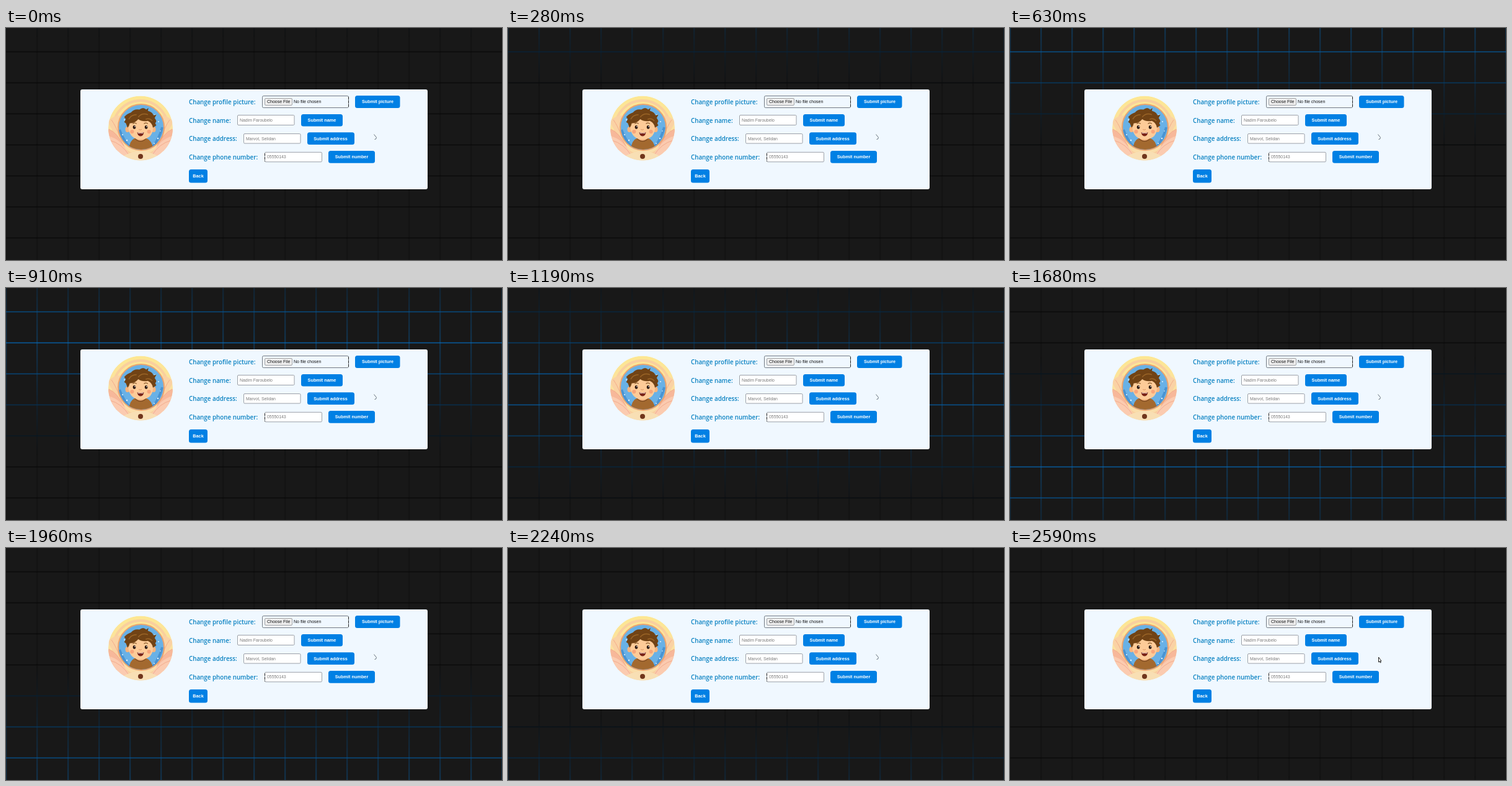
Recreate the animation shown at these times as an HTML page. Size 800 px wide and 374 px high, loop 2.66 s.

```html
<!DOCTYPE html>
<html lang="en">
<head>
<meta charset="utf-8">
<title>Edit profile</title>
<style>
  html, body { margin: 0; width: 100%; height: 100%; overflow: hidden; background: #050505; }
  svg { display: block; width: 800px; height: 374px; }
  .glow { animation: sweep 2660ms steps(38, end) infinite; }
  .rest { animation: rest 2660ms step-end infinite; }
  .moved { animation: moved 2660ms step-end infinite; }
  @keyframes sweep { from { transform: translateY(-360px); } to { transform: translateY(388px); } }
  @keyframes rest { 0% { opacity: 1; } 97.36%, 100% { opacity: 0; } }
  @keyframes moved { 0% { opacity: 0; } 97.36%, 100% { opacity: 1; } }
  .label { font: 600 9.8px "Open Sans", "Noto Sans", sans-serif; fill: #0a82c2; }
  .btn rect { fill: #0080e4; }
  .btn text { font: bold 7.3px "Liberation Sans", Arial, sans-serif; fill: #fff; text-anchor: middle; }
  .field rect { fill: #fff; stroke: #858a92; stroke-width: .8; }
  .field text { font: 6.9px "Liberation Sans", Arial, sans-serif; fill: #7b7b7b; }
  .file text { font: 7px "Liberation Sans", Arial, sans-serif; fill: #111; }
  .dash { stroke: #222; stroke-dasharray: 4 2; }
</style>
</head>
<body>
<svg viewBox="0 0 800 374">
  <defs>
    <linearGradient id="beam" x1="0" y1="0" x2="0" y2="1">
      <stop offset="0" stop-color="#030303"/>
      <stop offset=".5" stop-color="#0080e4"/>
      <stop offset="1" stop-color="#030303"/>
    </linearGradient>
    <pattern id="tiles" x="-.6" y="37.7" width="50" height="50" patternUnits="userSpaceOnUse">
      <rect width="50" height="1.2" fill="#181818" opacity=".14"/>
      <rect y="1.2" width="1.2" height="48.8" fill="#181818" opacity=".6"/>
      <rect x="1.2" y="1.2" width="48.8" height="48.8" fill="#181818"/>
    </pattern>
    <linearGradient id="cream" x1="0" y1="0" x2="0" y2="1">
      <stop offset="0" stop-color="#fde792"/>
      <stop offset="1" stop-color="#f9dcae"/>
    </linearGradient>
    <clipPath id="badge"><circle cx="217" cy="161.5" r="52"/></clipPath>
    <clipPath id="inner"><circle cx="218" cy="160" r="36"/></clipPath>
    <g id="petals">
      <path d="M164 150Q178 138 187 142Q177 156 183 176Q170 166 164 150Z" fill="#fad2a4"/>
      <path d="M162 162Q181 168 192 193Q178 203 166 190Z" fill="#f7b89a"/>
      <path d="M164 174Q185 178 199 204Q181 211 170 196Z" fill="#fbcbb0"/>
      <path d="M167 181Q187 186 199 206M166 163Q180 170 190 190M170 148Q177 158 184 176"
        fill="none" stroke="#f1a88a" stroke-width=".9"/>
    </g>
  </defs>

  <rect class="glow" width="800" height="374" fill="url(#beam)"/>
  <rect width="800" height="374" fill="url(#tiles)"/>
  <rect x="120" y="99" width="560" height="161" rx="3" fill="#f0f8ff"/>

  <!-- avatar -->
  <g clip-path="url(#badge)">
    <circle cx="217" cy="161.5" r="52" fill="url(#cream)"/>
    <circle cx="217" cy="161" r="44" fill="none" stroke="#f9cf9e" stroke-width="4"/>
    <use href="#petals"/>
    <use href="#petals" transform="matrix(-1 0 0 1 434 0)"/>
    <path d="M188 207Q217 190 246 207L238 216H196Z" fill="#f8dfb4"/>
    <circle cx="217" cy="207" r="4" fill="#70351b"/>
  </g>
  <circle cx="218" cy="160" r="37" fill="#69b1e6" stroke="#eba36f" stroke-width="2"/>
  <g clip-path="url(#inner)">
    <path d="M183 164Q190 184 202 194M252 160Q247 180 236 192" fill="none" stroke="#4a94d2" stroke-width="4"/>
    <g fill="#e4f4ff">
      <circle cx="191" cy="148" r="1"/><circle cx="246" cy="151" r="1"/>
      <circle cx="188" cy="172" r="1"/><circle cx="195" cy="181" r="1.2"/>
      <circle cx="245" cy="178" r="1.2"/><circle cx="249" cy="166" r=".8"/>
      <circle cx="239" cy="186" r=".9"/><circle cx="240" cy="140" r=".9"/>
    </g>
    <path d="M198 200Q198 182 207 178H227Q237 182 238 200Z" fill="#a3692f"/>
    <path d="M208 178Q217 187 226 178" fill="#efad76" stroke="#7e4b1f" stroke-width="1.2"/>
  </g>
  <g transform="translate(217 158) scale(.91) translate(-217 -158)">
    <g fill="#f6b57f">
      <ellipse cx="194" cy="164" rx="4" ry="5"/><ellipse cx="240" cy="164" rx="4" ry="5"/>
    </g>
    <path d="M195 152Q198 143 216 143Q236 143 239 156Q241 181 217 182Q194 181 195 152Z" fill="#fdcb98"/>
    <path d="M194 161L191 153L188 151L191 146L188 142Q193 136 200 134Q206 127 215 129Q222 123 227 129L231 126L230 131Q238 133 240 139L245 138L242 144Q247 149 243 153L245 157L239 161Q238 153 230 149Q220 151 213 146Q206 154 198 153Q197 158 194 161Z" fill="#714315"/>
    <path d="M196 146Q200 138 210 138M213 142Q220 134 230 138M226 146Q233 143 238 149"
      fill="none" stroke="#9b6527" stroke-width="1.6"/>
    <path d="M203 154Q207 151 210 154M223 154Q227 151 230 154" fill="none" stroke="#714315" stroke-width="1.2"/>
    <g fill="#2b1710"><ellipse cx="206" cy="160" rx="2.6" ry="3.2"/><ellipse cx="227" cy="160" rx="2.6" ry="3.2"/></g>
    <g fill="#fff"><circle cx="207" cy="159" r=".9"/><circle cx="228" cy="159" r=".9"/></g>
    <g fill="#f69c75" opacity=".8"><circle cx="202" cy="168" r="3.4"/><circle cx="232" cy="168" r="3.4"/></g>
    <path d="M214 164Q216.500 166 219 164" fill="none" stroke="#d98a59"/>
    <path d="M211 169Q217 171 223 169Q222 176 217 176Q212 176 211 169Z" fill="#792318"/>
    <path d="M212 169.500Q217 171 222 169.500L221.500 171H212.500Z" fill="#fff"/>
  </g>

  <!-- form -->
  <g class="label">
    <text x="295" y="123">Change profile picture:</text>
    <text x="295" y="152.500">Change name:</text>
    <text x="295" y="182.200">Change address:</text>
    <text x="295" y="212">Change phone number:</text>
  </g>
  <g class="file">
    <rect x="413.500" y="109.500" width="139" height="19" rx="2" fill="none" stroke="#555b64" stroke-width=".8"/>
    <path class="dash" d="M552.500 111V128"/>
    <rect x="417.500" y="113.500" width="44" height="11" rx="1.500" fill="#efefef" stroke="#8d8d8d" stroke-width=".8"/>
    <text x="421" y="121.300">Choose File</text>
    <text x="464" y="121.300">No file chosen</text>
  </g>
  <g class="field">
    <rect x="373.500" y="140.500" width="91.500" height="16" rx="1.500"/>
    <rect x="383.500" y="170.500" width="91.500" height="15.500" rx="1.500"/>
    <rect x="417.500" y="200.300" width="92" height="15.500" rx="1.500"/>
    <path class="dash" d="M417.500 202V215"/>
    <text x="377" y="151">Nadim Faroubelo</text>
    <text x="387" y="180.500">Marvot, Selidan</text>
    <text x="421" y="210.300">05550143</text>
  </g>
  <g class="btn">
    <rect x="563" y="109" width="72.500" height="20" rx="3.500"/>
    <rect x="476" y="139" width="67" height="19.500" rx="3.500"/>
    <rect x="486" y="168.300" width="76" height="19.700" rx="3.500"/>
    <rect x="520" y="198" width="75" height="19.700" rx="3.500"/>
    <rect x="295" y="228" width="30" height="21.500" rx="3.500"/>
    <text x="599.500" y="121.300">Submit picture</text>
    <text x="509.500" y="151">Submit name</text>
    <text x="523.500" y="180.500">Submit address</text>
    <text x="557.500" y="210.300">Submit number</text>
    <text x="310" y="241.300">Back</text>
  </g>

  <!-- pointer -->
  <path class="rest" d="M593.500 171.500L597.500 176.500L596.500 179L594.500 179.500"
    fill="none" stroke="#59616b" stroke-width=".9"/>
  <path class="moved" d="M594.500 176V184L596.200 182.500L597.300 185L598.300 184.500L597.200 182.200H599Z"
    fill="#fff" stroke="#111" stroke-width=".9"/>
</svg>
</body>
</html>
```
